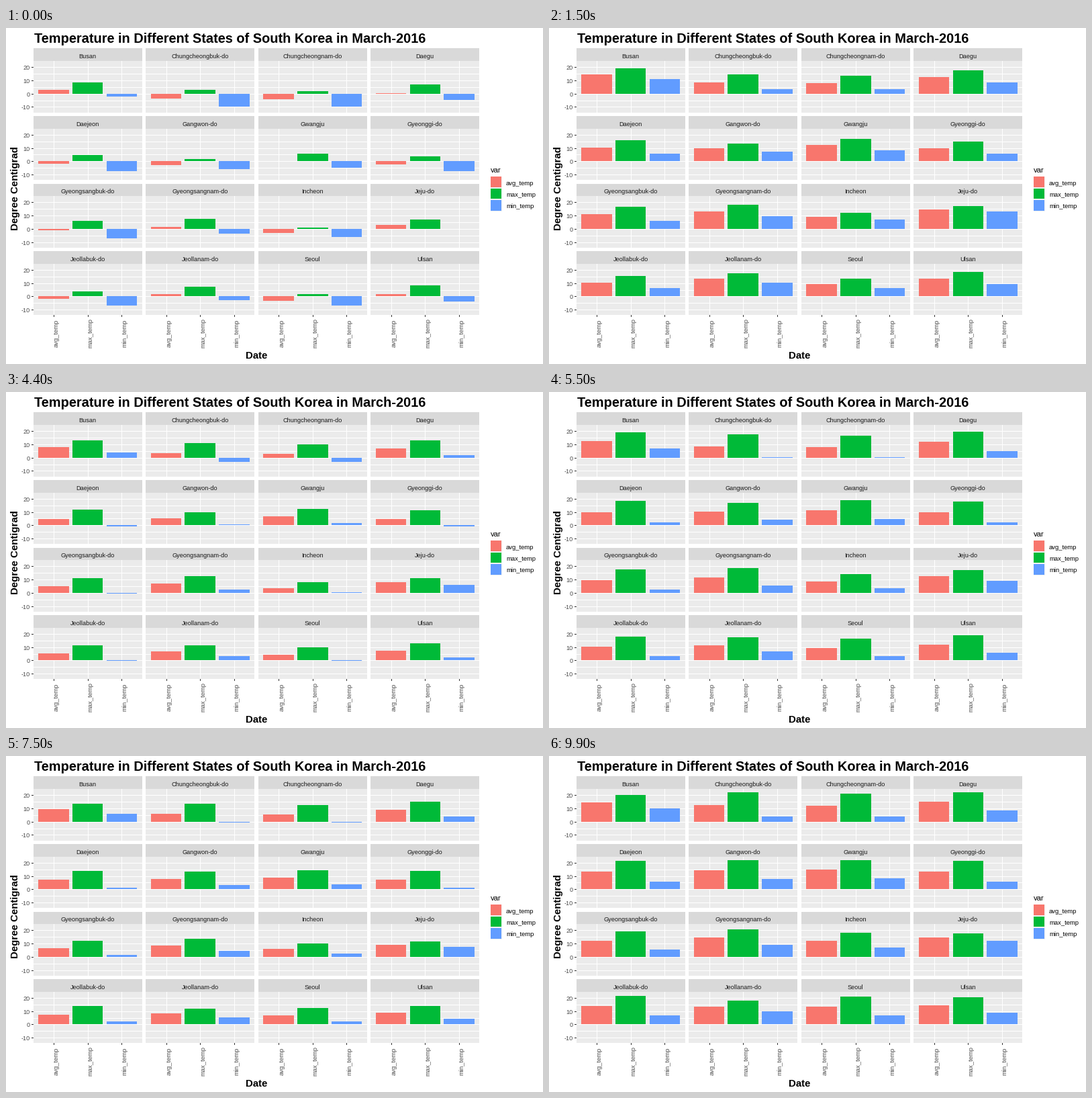
Recreate the animation shown at these times as a matplotlib script. Size 800x500 px, loop 10000 ms.

```python
import matplotlib.pyplot as plt
import numpy as np
from matplotlib.animation import FuncAnimation
from matplotlib.patches import Rectangle

W, H, DPI = 800, 500, 100
FRAMES, INTERVAL = 100, 100

COLORS = ["#F8766D", "#00BA38", "#619CFF"]
VARS = ["avg_temp", "max_temp", "min_temp"]

# Panel grid geometry in pixels
LEFT, PITCH_X, PANEL_W = 40.75, 167.53, 161.9
STRIP, PANEL, ZERO, BOTTOM, PITCH_Y = 30.4, 49.2, 97.65, 125.6, 100.6
DEGREE = 1.97
UNIT = PANEL_W / 3.2

# Nationwide turning points in March: day, daily high, daily low
DAY, HIGH, LOW = zip(
    (1, 4.9, -5.7), (4, 14.5, 5), (5.5, 16, 7.7), (9.5, 7.4, 0), (11, 7.7, -2.5),
    (14.3, 11.2, .8), (17, 18, 4), (21.3, 16, 4.2), (24.5, 12.2, 2.6),
    (26.8, 13.8, 1.9), (31, 20.6, 7.5))

# Local climate: offset of highs, offset of lows, extra warming over the month
CLIMATE = {
    "Busan": (1.6, 3, -2),
    "Chungcheongbuk-do": (-.3, -3.8, 1.7),
    "Chungcheongnam-do": (-1.3, -3.8, 1.7),
    "Daegu": (1.8, .8, 0),
    "Daejeon": (.4, -1.8, .7),
    "Gangwon-do": (-1, 0, 2.4),
    "Gwangju": (1.2, .8, .2),
    "Gyeonggi-do": (-.1, -1.8, 1.2),
    "Gyeongsangbuk-do": (-.1, -1.6, -1.3),
    "Gyeongsangnam-do": (1.3, 1.6, -1.1),
    "Incheon": (-3.4, -.4, .8),
    "Jeju-do": (-.3, 5, -2.6),
    "Jeollabuk-do": (.1, -.9, 1),
    "Jeollanam-do": (-.1, 2.6, -2.4),
    "Seoul": (-1.4, -1, 1.8),
    "Ulsan": (1.6, 1.6, -1.6),
}


def temperatures(name, day):
    """Average, maximum and minimum of a province on a (fractional) day."""
    warm, cold, drift = CLIMATE[name]
    drift *= (day - 16) / 15
    high = np.interp(day, DAY, HIGH) + warm + drift
    low = np.interp(day, DAY, LOW) + cold + .2 * drift
    return (high + low) / 2 - .4, high, low


plt.rcParams["font.family"] = "Liberation Sans"
fig = plt.figure(figsize=(W / DPI, H / DPI), dpi=DPI, facecolor="white")
ax = fig.add_axes([0, 0, 1, 1])
ax.set(xlim=(0, W), ylim=(H, 0))
ax.axis("off")


def box(x0, y0, x1, y1, color):
    x0, y0, x1, y1 = (round(v) for v in (x0, y0, x1, y1))
    return ax.add_patch(Rectangle((x0, y0), x1 - x0, y1 - y0, fc=color,
                                  lw=0, antialiased=False, snap=False))


def label(x, y, text, px, color="black", ha="left", **kw):
    ax.text(x, y, text, fontsize=px * 72 / DPI, color=color, ha=ha,
            va="baseline", rotation_mode="anchor", **kw)


def hline(y, x0, x1, color):
    box(x0, round(y), x1, round(y) + 1, color)


def vline(x, y0, y1, color):
    box(round(x), y0, round(x) + 1, y1, color)


def draw_panel(name, row, col):
    """Draw one facet and return its three bars with their zero line."""
    x0, dy = LEFT + col * PITCH_X, row * PITCH_Y
    x1, top, bottom, zero = x0 + PANEL_W, PANEL + dy, BOTTOM + dy, ZERO + dy
    box(x0, STRIP + dy, x1, top, "#D9D9D9")
    box(x0, top, x1, bottom, "#EBEBEB")
    label((x0 + x1) / 2, round(45 + dy), name, 9.2, "#1A1A1A", "center")
    for deg in range(-10, 21, 5):
        hline(zero - deg * DEGREE, x0, x1, "white")
    bars = []
    for i, color in enumerate(COLORS):
        mid = x0 + (i + .6) * UNIT
        vline(mid, top, bottom, "white")
        if row == 3:
            vline(mid, bottom, bottom + 3, "#333333")
            label(mid + 7, 454, VARS[i], 9.4, "#4D4D4D", "center", rotation=90)
        bars.append(box(mid - .45 * UNIT, zero, mid + .45 * UNIT, zero, color))
    if col == 0:
        for deg in range(-10, 21, 10):
            y = round(zero - deg * DEGREE)
            hline(y, x0 - 3, x0, "#333333")
            label(36, y + 4, str(deg), 9.2, "#4D4D4D", "right")
    return bars, zero


panels = {name: draw_panel(name, *divmod(k, 4))
          for k, name in enumerate(CLIMATE)}

label(41.5, 22, "Temperature in Different States of South Korea in March-2016",
      20.05, weight="bold")
label(373, 492, "Date", 15, ha="center", weight="bold")
label(18, 238.5, "Degree Centigrad", 15, ha="center", weight="bold", rotation=90)

label(722, 215, "var", 11.2)
for i, (name, color) in enumerate(zip(VARS, COLORS)):
    y = 220.75 + 17.28 * i
    box(722, y, 739, y + 17.28, "#F2F2F2")
    box(722, y + .7, 738, y + 16.3, color)
    label(745, round(y + 13), name, 9.4)


def update(frame):
    day = 1 + 30 * frame / (FRAMES - 1)
    changed = []
    for name, (bars, zero) in panels.items():
        for bar, value in zip(bars, temperatures(name, day)):
            bar.set_height(round(zero - value * DEGREE) - round(zero))
            changed.append(bar)
    return changed


anim = FuncAnimation(fig, update, frames=FRAMES, interval=INTERVAL,
                     repeat=True, repeat_delay=0, blit=False)
plt.show()
```
